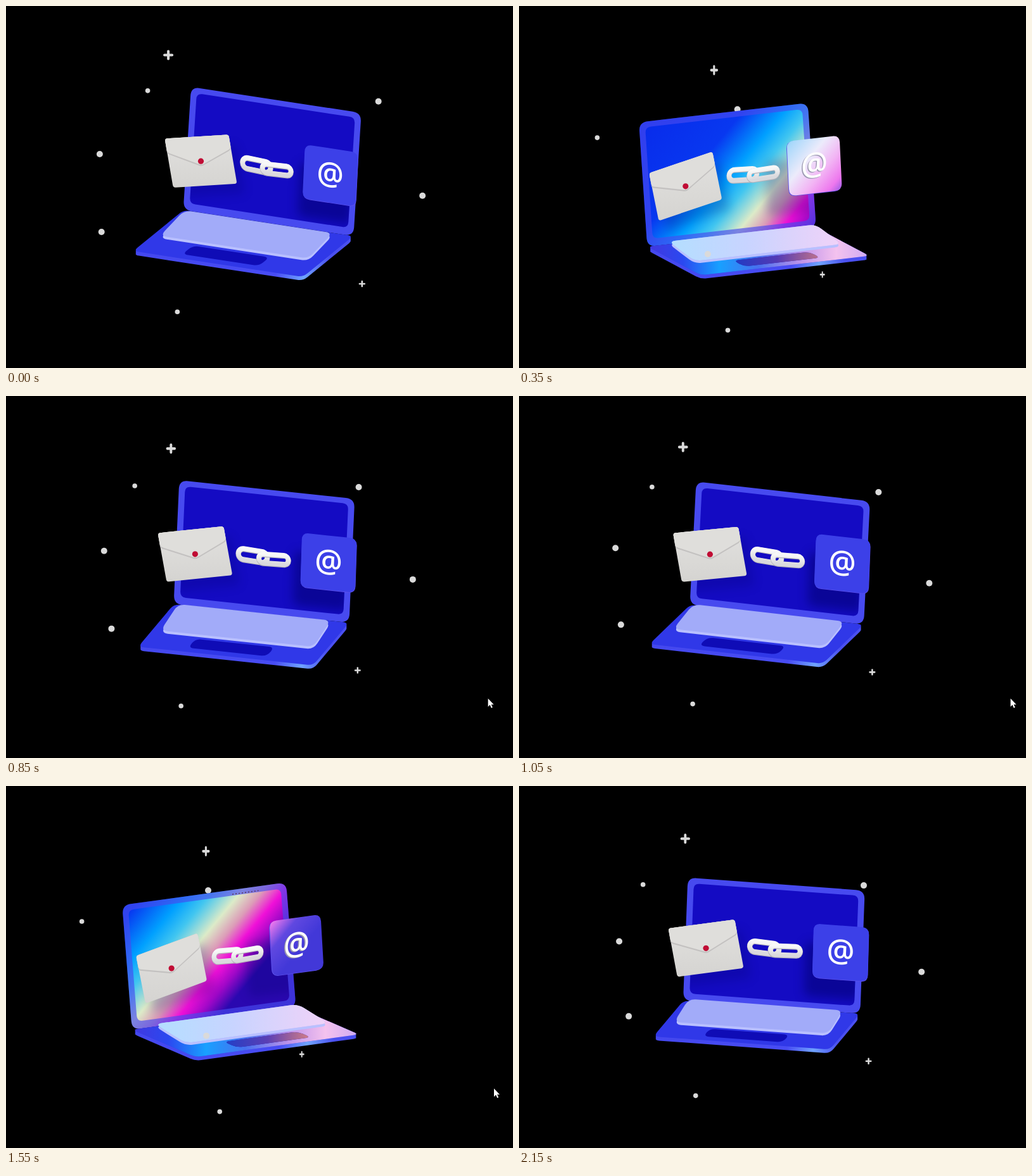
Animation, 800 px wide and 572 px high, one loop 2200 ms. Source, as an HTML page:

```html
<!DOCTYPE html>
<html lang="en">
<head>
<meta charset="utf-8">
<title>Laptop</title>
<style>
html, body { margin: 0; width: 100%; height: 100%; overflow: hidden; background: #000; }
svg { display: block; width: 100vw; height: 100vh; }
text { font: 600 50px "Open Sans", "Noto Sans", sans-serif; text-anchor: middle; }
</style>
</head>
<body>
<svg id="stage" viewBox="0 0 800 572">
  <defs>
    <linearGradient id="screenFill" gradientUnits="userSpaceOnUse"></linearGradient>
    <linearGradient id="cardFill" gradientUnits="userSpaceOnUse"></linearGradient>
    <linearGradient id="baseGlow">
      <stop offset="0" stop-color="#4038e0"/><stop offset=".15" stop-color="#2b48f0"/>
      <stop offset=".32" stop-color="#18a0ff"/><stop offset=".5" stop-color="#4870ee"/>
      <stop offset=".7" stop-color="#c094ea"/><stop offset=".86" stop-color="#f4c2ee"/>
      <stop offset="1" stop-color="#d0acf2"/>
    </linearGradient>
    <linearGradient id="keysGlow">
      <stop offset="0" stop-color="#b4deff"/><stop offset=".45" stop-color="#c8d4ff"/>
      <stop offset="1" stop-color="#f0d2f8"/>
    </linearGradient>
    <linearGradient id="padGlow">
      <stop offset="0" stop-color="#2848c8"/><stop offset=".5" stop-color="#6848b4"/>
      <stop offset="1" stop-color="#f09080"/>
    </linearGradient>
    <linearGradient id="edgeFill">
      <stop offset="0" stop-color="#4448ee"/><stop offset=".65" stop-color="#484cf4"/>
      <stop offset=".78" stop-color="#70a4ff"/><stop offset=".9" stop-color="#4a50f0"/>
    </linearGradient>
    <linearGradient id="paper" x2="0" y2="1">
      <stop offset="0" stop-color="#e2e1df"/><stop offset="1" stop-color="#d5d4d1"/>
    </linearGradient>
    <linearGradient id="metal" x2="0" y2="1">
      <stop offset="0" stop-color="#f8f8f8"/><stop offset="1" stop-color="#dad9dd"/>
    </linearGradient>
    <filter id="soft" x="-40%" y="-40%" width="180%" height="180%"><feGaussianBlur stdDeviation="8"/></filter>
    <clipPath id="screenClip"><path id="clipShape"/></clipPath>
  </defs>
</svg>
<script>
const stage = document.getElementById("stage");
const LOOP = 2200, STEP = 50;
const SWINGS = [28, 540, 978, 1528, 2042], SWING_TIME = 400;
const POINTER_VISITS = [800, 1750];

// flat parts around the turning axis: centre, width, drop and depth from back edge to front edge
const LID = { x: 0, y: -92.3, z: -132.5, w: 285, h: 184.6, d: 37 };
const BASE = { x: 0, y: 0, z: 5, w: 284, h: 0, d: 238 };
const KEYS = { x: 0, y: -7.5, z: -9.5, w: 248, h: 9, d: 115 };
const PAD = { x: 0, y: -3, z: 87, w: 128, h: 0, d: 50 };
const LETTER = { x: -96, y: -97, z: -66, w: 109, h: 76, d: 3, roll: -.2 };
const CARD = { x: 121, y: -106, z: -65, w: 89, h: 82, d: 12 };
const LINKS = [{ x: -1, y: -106, z: -61, w: 47, h: 17, tilt: 3 }, { x: 33, y: -104, z: -60, w: 48, h: 14, tilt: -2 }];
const DOTS = [
  { x: -214, y: -169, z: -148, r: 3.8 },
  { x: -196, y: -147, z: 130, r: 5, layer: "middle" },
  { x: 100, y: -142, z: -352, r: 5 },
  { x: 219, y: -45, z: -224, r: 5 },
  { x: -82, y: 98, z: 85, r: 3.8 },
  { x: -164, y: -51, z: 212, r: 5, layer: "front" }
];
const PLUSES = [{ x: -101, y: -302, z: 74, r: 6 }, { x: 155, y: 75, z: -119, r: 3.9 }];

// distance from the magenta band, colour
const SCREEN_WAVE = [[-300, ""], [-165, "#0838f0"], [-115, "#00a0ff"], [-85, "#42c6f0"],
  [-50, "#dcebc8"], [-25, "#dc9cb8"], [0, "#f010d8"], [24, "#a008c8"], [50, "#2a08b0"]];
const CARD_WAVE = [[-180, "#3c40e8"], [-110, "#28a0fc"], [-75, "#a8d8fb"],
  [-38, "#ecebfb"], [-8, "#f2b4f4"], [18, "#ee78ee"], [45, "#6048e0"], [80, "#4238d8"]];

const mix = (a, b, k) => a + (b - a) * k;
const clamp = k => Math.max(0, Math.min(1, k));
const ramp = (a, b, k) => { const u = clamp((k - a) / (b - a)); return u * u * (3 - 2 * u); };
const set = (node, attrs) => { for (const k in attrs) node.setAttribute(k, attrs[k]); };

function add(tag, attrs, parent = stage) {
  const node = document.createElementNS("http://www.w3.org/2000/svg", tag);
  set(node, attrs);
  return parent.appendChild(node);
}

// 0 faces right, 1 faces left; swings alternate
const turnAt = t => SWINGS.reduce((sum, s, i) => sum + (i % 2 ? -1 : 1) * ramp(s, s + SWING_TIME, t), 0);

function makeView(t) {
  const turn = turnAt(t), yaw = mix(-.34, .44, turn);
  const nod = .04 * (1 - turn) * Math.cos((t - 850) / 1000 * 2 * Math.PI);
  const tilt = mix(.265, .2, turn) + nod;
  const c = Math.cos(yaw), s = Math.sin(yaw), slope = -1.5 * tilt * s;
  const project = ({ x, y, z }) => [
    376 + x * c + z * s,
    mix(374, 388, turn) + y * (1 + .03 * turn) + x * slope + z * c * tilt
  ];
  const surface = p => (u, v) => {
    const dx = u * p.w, dy = v * p.h, rc = Math.cos(p.roll || 0), rs = Math.sin(p.roll || 0);
    return project({ x: p.x + dx * rc - dy * rs, y: p.y + dx * rs + dy * rc, z: p.z + v * p.d });
  };
  const facing = p => `matrix(${c} ${slope} 0 1 ${project(p)})`;
  return { turn, project, surface, facing };
}

const box = (at, left = -.5, top = -.5, right = .5, bottom = .5) =>
  [at(left, top), at(right, top), at(right, bottom), at(left, bottom)];
const shift = (pts, dx, dy) => pts.map(([x, y]) => [x + dx, y + dy]);

function rounded(pts, radius) {
  const toward = (p, q) => {
    const k = Math.min(.5, radius / Math.hypot(q[0] - p[0], q[1] - p[1]));
    return [mix(p[0], q[0], k), mix(p[1], q[1], k)];
  };
  return pts.map((p, i) => {
    const before = pts[(i + pts.length - 1) % pts.length], after = pts[(i + 1) % pts.length];
    return `${i ? "L" : "M"}${toward(p, before)}Q${p} ${toward(p, after)}`;
  }).join("") + "Z";
}

function makeWave(id, wave) {
  const gradient = document.getElementById(id), first = wave[0][0], last = wave[wave.length - 1][0];
  for (const [d, color] of wave) add("stop", { offset: (d - first) / (last - first), "stop-color": color }, gradient);
  return turn => {
    const band = 432 + (1 - turn) * 1120, nx = .77, ny = .64;
    set(gradient, { x1: nx * (band + first), y1: ny * (band + first), x2: nx * (band + last), y2: ny * (band + last) });
    return gradient;
  };
}
const moveScreenWave = makeWave("screenFill", SCREEN_WAVE);
const moveCardWave = makeWave("cardFill", CARD_WAVE);

const path = (fill, extra = {}, parent = stage) => add("path", { fill, ...extra }, parent);
const layers = {};
const makeLayer = name => layers[name] = add("g", { fill: "#dadada", stroke: "#dadada", "stroke-width": 0 });

makeLayer("back");
const lid = path("#474aef"), lidGlow = path("url(#screenFill)");
const screen = path("url(#screenFill)");
const shadows = add("g", { "clip-path": "url(#screenClip)", fill: "#06036c" });
const cardShadow = add("path", { filter: "url(#soft)" }, shadows);
const letterShadow = add("path", { opacity: .22, filter: "url(#soft)" }, shadows);
const speaker = path("none", { stroke: "#5a3a60", "stroke-width": 1.6, "stroke-dasharray": "2 3" });
const edge = path("url(#edgeFill)");
const base = path("#3038e8"), baseGlow = path("url(#baseGlow)");
const keysEdge = path("#b9c0ff"), keys = path("#a2abf9"), keysGlow = path("url(#keysGlow)");
const pad = path("#0f0cb6"), padGlow = path("url(#padGlow)");
makeLayer("middle");
const letter = path("url(#paper)");
const flapShade = path("#c3c1c0"), flap = path("#dfdedb");
const seal = add("circle", { r: 4.6, fill: "#c00c34" });
const links = LINKS.map(({ w, h, tilt }) => {
  const group = add("g", {}), spin = add("g", { fill: "none", transform: `rotate(${tilt})` }, group);
  const shape = { x: -w / 2, y: -h / 2, width: w, height: h, rx: h / 2 };
  add("rect", { ...shape, stroke: "#b4b3ba", "stroke-width": 8.6, transform: "translate(0 .8)" }, spin);
  add("rect", { ...shape, stroke: "url(#metal)", "stroke-width": 7.8 }, spin);
  return group;
});
const cardEdge = path("#5c50ea"), card = path("url(#cardFill)");
const sign = add("g", {});
const signShade = add("text", { x: -1.8, y: 16, fill: "#9a98b0" }, sign);
const signFace = add("text", { x: 0, y: 15, fill: "#fff" }, sign);
signFace.textContent = signShade.textContent = "@";
makeLayer("front");

const dots = DOTS.map(d => add("circle", { r: d.r }, layers[d.layer || "back"]));
const pluses = PLUSES.map(({ r }) => add("path", { d: `M${-r} 0H${r}M0 ${-r}V${r}`,
  "stroke-width": r * .68, "stroke-linecap": "round" }, layers.back));
const pointer = path("#fff", { d: "M0 0V13L3 10L5.2 15L7.2 14L5 9.4H9Z" });

function draw(t) {
  const { turn, project, surface, facing } = makeView(t);
  const glow = ramp(.4, .75, turn);

  const lidAt = surface(LID), lidPath = rounded(box(lidAt), 14);
  const screenPath = rounded(box(lidAt, -.465, -.455, .465, .44), 9);
  set(lid, { d: lidPath });
  set(lidGlow, { d: lidPath, opacity: .35 * glow });
  set(screen, { d: screenPath });
  set(document.getElementById("clipShape"), { d: screenPath });
  set(speaker, { d: `M${lidAt(.17, -.465)}L${lidAt(.33, -.465)}`, opacity: ramp(.93, 1, turn) });
  const bright = ramp(.78, .9, turn);
  moveScreenWave(turn).firstChild.setAttribute("stop-color",
    `rgb(${mix(20, 8, bright)},${mix(11, 40, bright)},${mix(195, 234, bright)})`);
  moveCardWave(turn);

  const basePts = box(surface(BASE)), basePath = rounded(basePts, 9);
  set(edge, { d: [2, 4, 6].map(dy => rounded(shift(basePts, 0, dy), 9)).join("") });
  set(base, { d: basePath });
  set(baseGlow, { d: basePath, opacity: glow });
  const keysPts = box(surface(KEYS)), keysPath = rounded(shift(keysPts, 0, -3), 11);
  set(keysEdge, { d: rounded(shift(keysPts, 0, 1), 11) });
  set(keys, { d: keysPath });
  set(keysGlow, { d: keysPath, opacity: glow });
  const padPath = rounded(box(surface(PAD)), 9);
  set(pad, { d: padPath });
  set(padGlow, { d: padPath, opacity: .85 * ramp(.5, 1, turn) });

  const letterAt = surface(LETTER), letterPts = box(letterAt), [cx, cy] = project(LETTER);
  const flapPts = [letterAt(-.5, -.5), letterAt(.5, -.5), letterAt(.5, -.22), letterAt(0, .08), letterAt(-.5, -.22)];
  set(letter, { d: rounded(letterPts, 4) });
  set(letterShadow, { d: rounded(shift(letterPts, 12, 16), 4) });
  set(flapShade, { d: rounded(flapPts.map(([x, y], i) => [x, i > 1 ? y + 2.2 : y]), 4) });
  set(flap, { d: rounded(flapPts, 4) });
  set(seal, { cx, cy });
  links.forEach((link, i) => set(link, { transform: facing(LINKS[i]) }));

  const cardPts = box(surface(CARD));
  set(cardShadow, { d: rounded(shift(cardPts, mix(-8, -38, turn), mix(28, 34, turn)), 10), opacity: mix(.5, .25, glow) });
  set(cardEdge, { d: rounded(shift(cardPts, mix(.6, -1, turn), .8), 11) });
  set(card, { d: rounded(cardPts, 11) });
  set(sign, { transform: facing(CARD) });
  set(signShade, { opacity: ramp(.75, .92, turn) });

  dots.forEach((dot, i) => {
    const [cx, cy] = project(DOTS[i]);
    set(dot, { cx, cy });
  });
  pluses.forEach((plus, i) => set(plus, { transform: `translate(${project(PLUSES[i])}) scale(${1 - .25 * turn} 1)` }));

  const away = Math.min(...POINTER_VISITS.map(visit => Math.abs(t - visit)));
  set(pointer, { transform: `translate(${760 + .00025 * away * away} 478)` });
}

const start = performance.now();
function tick() {
  const t = (performance.now() - start) % LOOP;
  draw(Math.floor(t / STEP) * STEP);
  requestAnimationFrame(tick);
}
tick();
</script>
</body>
</html>
```
